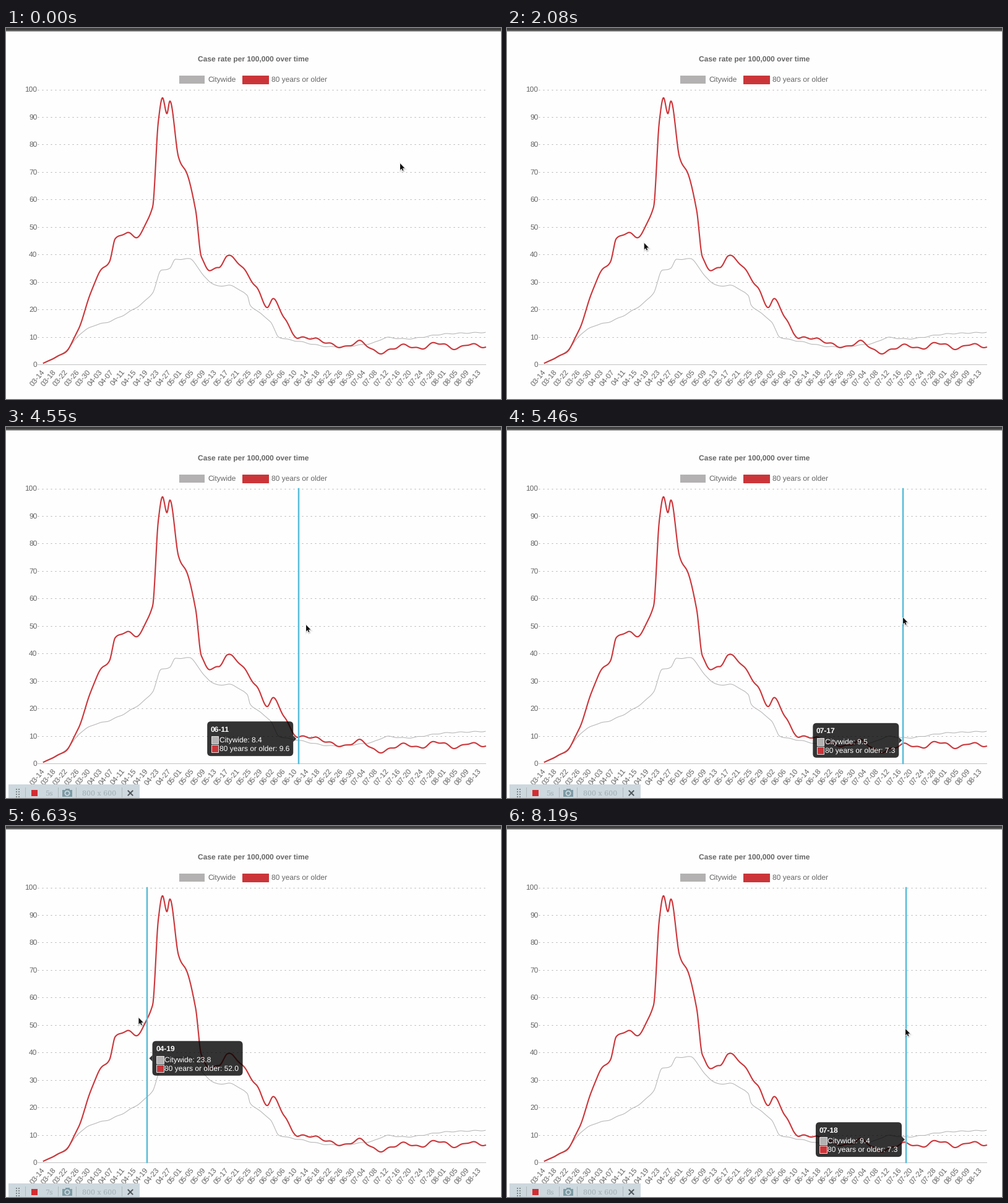
Recreate the animation shown at these times as a matplotlib script. Size 800x600 px, loop 8.58 s.

```python
import numpy as np
import matplotlib.pyplot as plt
from matplotlib.animation import FuncAnimation
from matplotlib.patches import Circle, FancyBboxPatch, Polygon, Rectangle
from matplotlib.transforms import Affine2D

W, H, DPI = 800, 600, 100
PT = 72 / DPI
INTERVAL, FRAMES = 130, 66
HOVER_START = 3770
GUIDE_DELAY = 48
DAYS = 154
LEFT, RIGHT, TOP, BOTTOM = 60.7, 774.8, 99.5, 544.2
GREY, RED, BLUE, INK, PAPER = "#b3b1b1", "#cb3539", "#56bdd9", "#666666", "#fefefe"

# Main turns of each curve: (day, rate)
CITY = [(0, .5), (4, 2.3), (8, 5.2), (13, 11.3), (18, 14.3), (22, 15.3), (32, 20.5),
        (38, 26.1), (41, 34.2), (44, 35), (46, 38.2), (51, 38.4), (56, 32), (61, 28.5),
        (64, 28.8), (71, 25), (72, 21.7), (74, 19.8), (79, 15.6), (82, 10), (89, 8.4),
        (101, 6.4), (114, 7.6), (120, 9.8), (126, 9.3), (140, 11.1), (154, 11.7)]
OLDER = [(0, .5), (4, 2.5), (8, 4.9), (12, 12.6), (19, 32.6), (23, 37.8), (25, 45.4),
         (29, 47.9), (32, 46.4), (38, 57.6), (40, 88), (41.5, 97), (43, 91.6), (44, 95.8),
         (47, 75.8), (50, 69), (53, 56.5), (55, 38.8), (58, 34.5), (61, 35), (64, 39.5),
         (74, 28.4), (78, 21.1), (80, 23.6), (84, 16.8), (87, 11.2), (89, 9.6), (92, 9.7),
         (105, 6.3), (110, 8.4), (117, 4.2), (126, 7.05), (131, 5.7), (137, 7.9),
         (144, 5.7), (148, 7.4), (154, 6.3)]

# Turns and rests of the pointer tip: (ms, x, y)
POINTER = [(0, 637, 219), (130, 637, 219), (1170, 245, 356), (1300, 245, 356),
           (2860, 197, 338), (3380, 196, 337), (3640, 196, 337), (4550, 485, 320),
           (5460, 640, 308), (6240, 342, 305), (6760, 200, 311), (7150, 438, 304),
           (7540, 690, 328), (8190, 644, 328), (8580, 644, 328)]


def spline(knots, x):
    """Monotone cubic through the knots."""
    kx, ky = np.array(knots, float).T
    slope = np.diff(ky) / np.diff(kx)
    a, b = slope[:-1], slope[1:]
    same = a * b > 0
    inner = np.where(same, 2 * a * b / np.where(same, a + b, 1), 0)
    m = np.concatenate(([slope[0]], inner, [slope[-1]]))
    i = np.clip(np.searchsorted(kx, x, "right") - 1, 0, len(kx) - 2)
    h = kx[i + 1] - kx[i]
    t = np.clip((x - kx[i]) / h, 0, 1)
    return (ky[i] * (1 + 2 * t) * (1 - t) ** 2 + h * m[i] * t * (1 - t) ** 2
            + ky[i + 1] * t * t * (3 - 2 * t) + h * m[i + 1] * t * t * (t - 1))


def ripple(day):
    """Short reporting cycle that rides on the main trend."""
    return np.minimum(day / 20, 1) * np.sin(2 * np.pi * (day - 64) / 5)


def city_rate(day):
    return spline(CITY, day) + .15 * ripple(day)


def older_rate(day):
    return spline(OLDER, day) + .4 * ripple(day)


def day_x(day):
    return LEFT + day * (RIGHT - LEFT) / DAYS


def rate_y(rate):
    return BOTTOM - rate * (BOTTOM - TOP) / 100


def date(day):
    n = day + 13
    for month, length in ((3, 31), (4, 30), (5, 31), (6, 30), (7, 31), (8, 31)):
        if n < length:
            return f"{month:02}-{n + 1:02}"
        n -= length


plt.rcParams.update({"font.family": "Liberation Sans", "text.hinting": "none"})
fig = plt.figure(figsize=(W / DPI, H / DPI), dpi=DPI, facecolor=PAPER)
ax = fig.add_axes([0, 0, 1, 1])
ax.set(xlim=(0, W), ylim=(H, 0))
ax.axis("off")


def place(artist, shift=None):
    ax.add_artist(artist)
    if shift is not None:
        artist.set_transform(shift + ax.transData)
    return artist


def rect(x, y, w, h, color, z=1, shift=None, **kw):
    return place(Rectangle((x, y), w, h, fc=color, zorder=z, **kw), shift)


def label(x, y, text, size=12, color=INK, shift=None, **kw):
    kw = {"va": "center_baseline", "zorder": 3, **kw}
    t = ax.text(x, y, text, fontsize=size * PT, color=color, **kw)
    if shift is not None:
        t.set_transform(shift + ax.transData)
    return t


def stroke(xs, ys, color, px, z=2, **kw):
    return ax.plot(xs, ys, color=color, lw=px * PT, zorder=z, **kw)[0]


# Window edge, title and legend
for row in range(6):
    rect(0, row, W, 1, str(.25 + .42 * (row / 5) ** 4))
label(400, 50, "Case rate per 100,000 over time", weight="bold", ha="center")
rect(280, 77, 41, 13, GREY)
label(326.5, 83.3, "Citywide")
rect(382, 77, 42, 13, RED, ec=RED, lw=PT)
label(429, 83.3, "80 years or older")

# Axes
for rate in range(0, 101, 10):
    y = rate_y(rate)
    label(50.5, y - .5, str(rate), ha="right")
    if rate:
        stroke([51, RIGHT], [y, y], "#b0b0b0", 1, 1, ls=(0, (2, 5)))
stroke([51, RIGHT], [BOTTOM, BOTTOM], "#c2c2c2", 1, 1)
for day in range(0, DAYS, 4):
    label(day_x(day), 554, date(day), ha="right", va="center", rotation=50,
          rotation_mode="anchor")

# Curves
fine = np.linspace(0, DAYS, DAYS * 6 + 1)
stroke(day_x(fine), rate_y(city_rate(fine)), GREY, 1)
stroke(day_x(fine), rate_y(older_rate(fine)), RED, 2.1, 2.5)

# Guide and tooltip
guide = stroke([0, 0], [TOP, BOTTOM], BLUE, 2.5, 4)
tip_at = Affine2D()
bubble_style = dict(fc=(0, 0, 0, .8), ec="none", zorder=5)
bubble = place(FancyBboxPatch((0, 0), 139, 56, boxstyle="round,pad=0,rounding_size=6",
                              **bubble_style), tip_at)
caret = place(Polygon([(0, 0), (1, 1), (0, 1)], **bubble_style), tip_at)
white = dict(color="white", shift=tip_at, zorder=7)
tip_date = label(5.5, 12, "", weight="bold", **white)
tip_city = label(19.5, 30, "", **white)
tip_older = label(19.5, 44, "", **white)
swatches = [rect(6.5, y, 11.5, 11.5, c, 6, tip_at, ec="#e4e0e0", lw=PT)
            for y, c in ((24.3, GREY), (38.3, RED))]
tooltip = [guide, bubble, caret, tip_date, tip_city, tip_older, *swatches]

# Recorder bar
PANEL, FAINT, DIVIDER, TEAL = "#cdd8de", "#9dabb0", "#aeb8bc", "#7d9ba4"
serif = dict(size=11, color=FAINT, family="DejaVu Serif", zorder=9)
seconds = label(63, 591.5, "", **serif)
bar = [seconds,
       label(123, 591.5, "800 x 600", **serif),
       rect(4, 578, 212, 22, PANEL, 8),
       rect(41, 587, 10, 10, "#d22d31", 9),
       rect(91, 587, 16, 11, TEAL, 9),
       rect(95.5, 585, 7, 3, TEAL, 9),
       place(Circle((99, 592.3), 3.6, fc=TEAL, ec=PANEL, lw=1.3, zorder=10))]
bar += [rect(x, 583, 1, 16, DIVIDER, 9) for x in (31, 84, 113, 187)]
bar += [rect(x, y, 2, 2, "#7f898d", 9) for x in (16, 20) for y in range(585, 598, 4)]
bar += [stroke([197.5, 204.5], [592 - d, 592 + d], "#50585c", 2, 9) for d in (-3.5, 3.5)]

# Pointer
pointer_at = Affine2D()
ARROW = .92 * np.array([(0, 0), (0, 11.6), (2.6, 9.2), (4.2, 13), (6, 12.2), (4.4, 8.5), (8, 8.3)])
for spread, alpha in ((3.5, .05), (2, .09)):
    place(Polygon(ARROW + (.6, 1.4), fc=(0, 0, 0, alpha), ec=(0, 0, 0, alpha),
                  lw=spread * PT, zorder=11), pointer_at)
place(Polygon(ARROW, fc="white", ec="white", lw=1.6 * PT, zorder=12), pointer_at)
place(Polygon(ARROW, fc="#111111", ec="none", zorder=13), pointer_at)


def pointer(ms):
    return [float(spline([(k[0], k[axis]) for k in POINTER], ms)) for axis in (1, 2)]


def show_tooltip(ms):
    seen = pointer(ms - GUIDE_DELAY)[0]
    day = int(np.clip(round((seen - LEFT) / (day_x(1) - LEFT)), 0, DAYS))
    city, older = float(city_rate(day)), float(older_rate(day))
    x = day_x(day)
    guide.set_xdata([x, x])
    tip_date.set_text(date(day))
    tip_city.set_text(f"Citywide: {city:.1f}")
    tip_older.set_text(f"80 years or older: {older:.1f}")

    # The faster the pointer, the further the tooltip trails behind the guide
    speed = abs(pointer(ms)[0] - pointer(ms - INTERVAL)[0]) / INTERVAL
    trail = min(340 * speed ** 3, 2 * INTERVAL)
    anchor = x + pointer(ms - GUIDE_DELAY - trail)[0] - seen

    width = 139 if round(older, 1) < 10 else 146
    on_right = x < (LEFT + RIGHT) / 2
    edge, out = (0, -5) if on_right else (width, 5)
    left = anchor + (7 if on_right else -7 - width)
    middle = (rate_y(city) + rate_y(older)) / 2
    bubble.set_bounds(0, 0, width, 56)
    caret.set_xy([(edge, 23), (edge + out, 28), (edge, 33)])
    tip_at.clear().translate(left, middle - 28)


def update(frame):
    ms = frame * INTERVAL
    pointer_at.clear().translate(*pointer(ms))
    hovering = ms >= HOVER_START
    for artist in tooltip + bar:
        artist.set_visible(hovering)
    if hovering:
        show_tooltip(ms)
        seconds.set_text(f"{int(ms / 1000 + .5)}s")
    return []


anim = FuncAnimation(fig, update, frames=FRAMES, interval=INTERVAL, repeat=True,
                     repeat_delay=0, blit=False)
plt.show()
```
